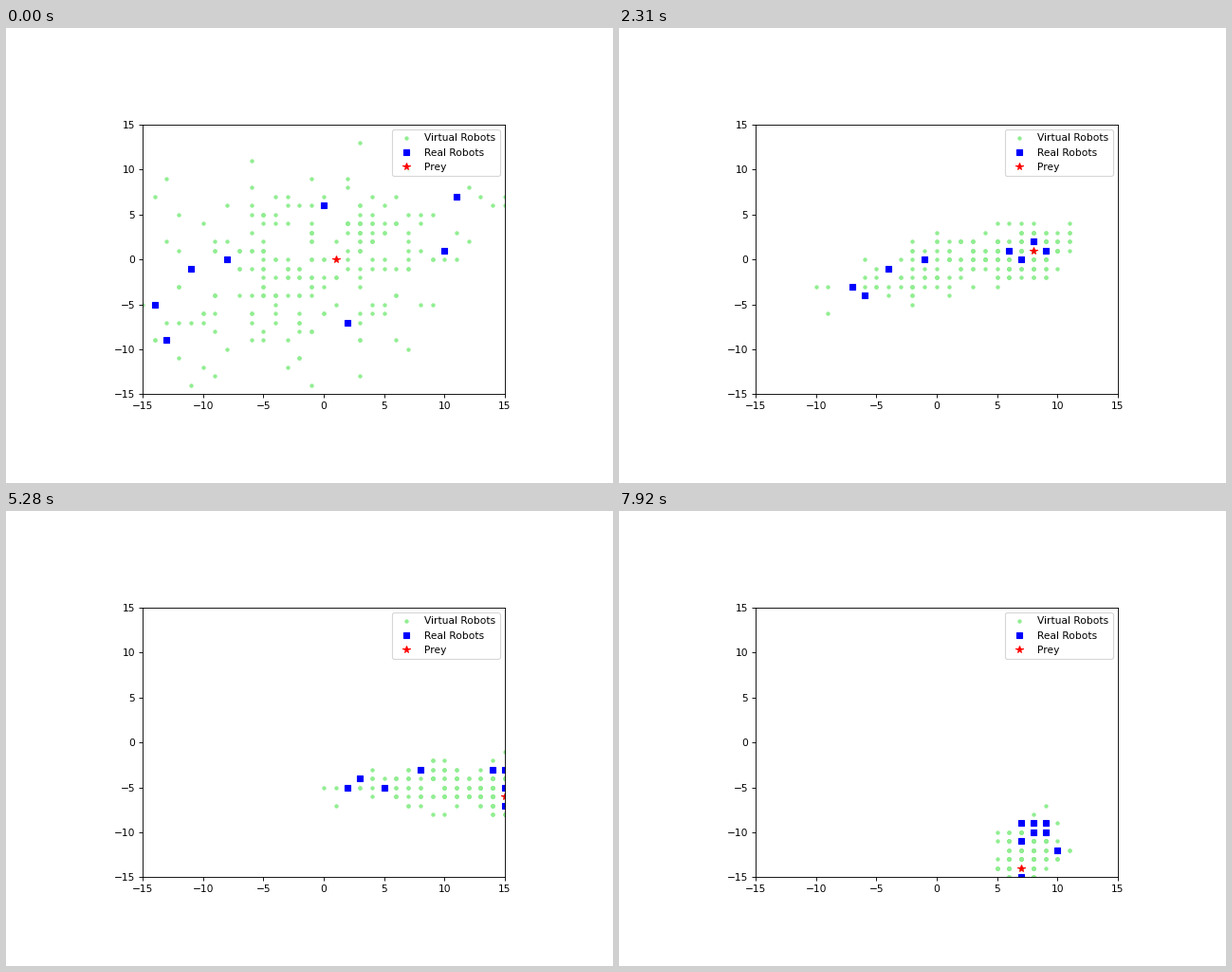
Animation, 640 px wide and 480 px high, one loop 8000 ms. Source, as a matplotlib script:

```python
import numpy as np
import matplotlib.pyplot as plt
from matplotlib.animation import FuncAnimation

LOOP, TICK, STEP = 8000, 40, 330          # milliseconds
SWARM = 240

# Each real robot visits these cells at the given steps.
KEYS = (0, 7, 16, 20, 24)
PATHS = np.array([
    [(-14, -5), (-7, -3), (2, -5), (6, -8), (7, -11)],
    [(-13, -9), (-6, -4), (3, -4), (7, -6), (7, -9)],
    [(-11, -1), (-4, -1), (5, -5), (8, -6), (8, -9)],
    [(-8, 0), (-1, 0), (8, -3), (9, -7), (8, -10)],
    [(0, 6), (6, 1), (15, -3), (11, -7), (9, -9)],
    [(2, -7), (7, 0), (14, -3), (10, -7), (9, -10)],
    [(10, 1), (9, 1), (15, -7), (11, -11), (7, -15)],
    [(11, 7), (8, 2), (15, -5), (13, -9), (10, -12)],
])

rng = np.random.default_rng(5)
leader = np.arange(SWARM) % len(PATHS)
ahead = rng.uniform(0, 1, (SWARM, 1))     # share of the way to the prey
drift = rng.normal(0, 1, (SWARM, 2)).clip(-2.5, 2.5)


def to_grid(p):
    return np.floor(np.asarray(p) + 0.5)


def prey_at(step):
    """Run right, slide down the wall, pause, then run back down-left."""
    x = min(1 + step, 15, 31 - step)
    y = min(step // 7, max(8 - step, min(-6, 10 - step)))
    return np.array([x, y])


def robots_at(step):
    return to_grid([[np.interp(step, KEYS, axis) for axis in path.T]
                    for path in PATHS])


def swarm_at(step):
    """Virtual robots fill the way from robots to prey, ever more tightly."""
    home = robots_at(step)[leader]
    spread = 0.8 + 4 * np.exp(-step / 4)
    return to_grid(home + ahead * (prey_at(step) - home) + spread * drift)


plt.rcParams["font.size"] = 9.6
fig = plt.figure(figsize=(8, 6), dpi=80)
ax = fig.add_axes([144 / 640, 93.6 / 480, 381.9 / 640, 284.6 / 480])
ticks = range(-15, 16, 5)
ax.set(xlim=(-15, 15), ylim=(-15, 15), xticks=ticks, yticks=ticks)

virtual, = ax.plot([], [], "o", color="lightgreen", ms=2.9,
                   label="Virtual Robots")
real, = ax.plot([], [], "s", color="blue", ms=4.8, label="Real Robots")
prey, = ax.plot([], [], "*", color="red", ms=6.7, label="Prey")
ax.legend(loc="upper right")


def draw(i):
    step = (i * TICK + TICK - 1) // STEP
    virtual.set_data(*swarm_at(step).T)
    real.set_data(*robots_at(step).T)
    prey.set_data(*prey_at(step)[:, None])
    return virtual, real, prey


anim = FuncAnimation(fig, draw, frames=LOOP // TICK, interval=TICK,
                     repeat=True, repeat_delay=0)
plt.show()
```
